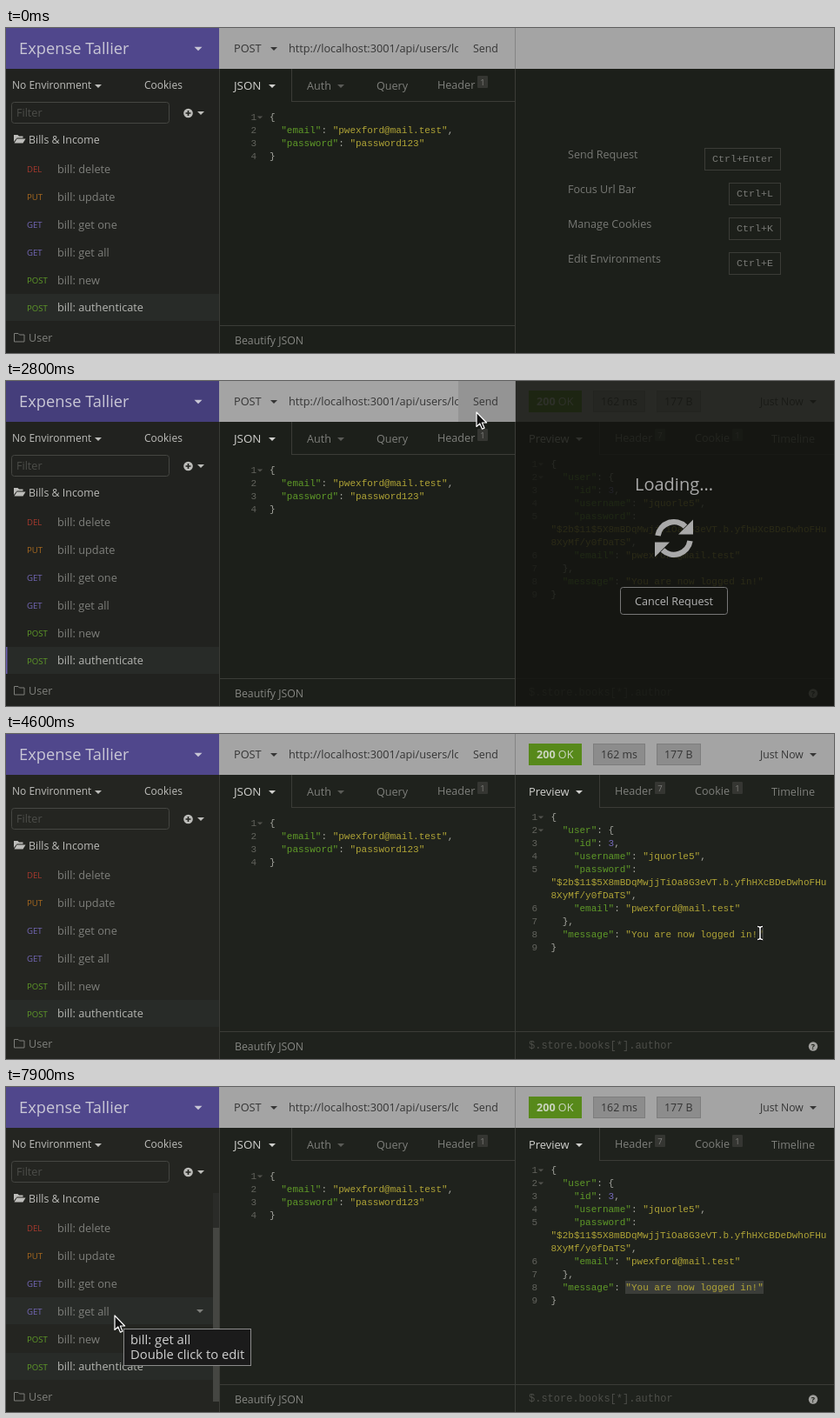
These frames come from a looping animation (952 px wide and 374 px high, 8 s). An HTML page:

```html
<!DOCTYPE html>
<html lang="en">
<head>
<meta charset="utf-8">
<title>API client</title>
<style>
html, body { margin: 0; width: 100%; height: 100%; overflow: hidden; background: #1c1e1a; }
svg { display: block; width: 100vw; height: 100vh; --brand: #50478c; --side: #21221f; --edit: #1c1f1a; }
svg.busy { --brand: #453e7b; }
svg.done { --side: #242521; --edit: #1f221d; }
text { font-family: "Open Sans", "Noto Sans", sans-serif; white-space: pre; }
.mono { font-family: "Liberation Mono", monospace; }
</style>
</head>
<body>
<svg id="stage" viewBox="0 0 952 374" preserveAspectRatio="none"></svg>
<script>
const LOOP = 8000, STEP = 100;
const GREY = '#7e7f7b', LIGHT = '#bdbdba', INK = '#353535', LINE = '#3b3c37', BAR = '#a4a4a4';
const GREEN = '#5f9a28', GOLD = '#b0a436', VIOLET = '#7468b8';

const text = (x, y, s, fill, size = 12.6, more = '') =>
  `<text x="${x}" y="${y}" fill="${fill}" font-size="${size}" ${more}>${s}</text>`;
const mono = (x, y, s, fill, size = 11, more = '') => text(x, y, s, fill, size, 'class="mono" ' + more);
const rect = (x, y, w, h, fill, more = '') =>
  `<rect x="${x}" y="${y}" width="${w}" height="${h}" fill="${fill}" ${more}/>`;
const box = (x, y, w, h, stroke, fill = 'none', r = 0) =>
  rect(x + .5, y + .5, w - 1, h - 1, fill, `stroke="${stroke}" rx="${r}"`);
const caret = (x, y, fill, r = 4) =>
  `<path d="M${x - r} ${y - r / 2}h${2 * r}l${-r} ${r}z" fill="${fill}"/>`;
const group = (id, body) => `<g id="${id}">${body}</g>`;
const badge = (x, n) => rect(x, 55, 12, 14, '#353632', 'rx="1"') + text(x + 6, 66, n, GREY, 9.5, 'text-anchor="middle"');

// One line of JSON with coloured keys, strings and numbers
const json = (x, y, s) => mono(x, y, s.replace(
  /("[^"]*"(?=:))|("[^"]*"?|^\w[^"]*")|(\d+)/g,
  (m, key, str) => `<tspan fill="${key ? GREEN : str ? GOLD : VIOLET}">${m}</tspan>`), '#a6a7a0');
const number = (x, y, n, fold) =>
  mono(x, y, n, '#62635d', 11, 'text-anchor="end"') + (fold ? caret(x + 4, y - 3, '#50514c', 3.2) : '');
// Entries without a number are wrapped parts of the line above
const listing = (x, y, gutter, lines) => lines.map(([n, s, fold], i) =>
  (n ? number(gutter, y + 15 * i, n, fold) : '') + json(x, y + 15 * i, s)).join('');

const rows = [
  ['DEL', 'delete', '#a83a2e'], ['PUT', 'update', '#a8691f'], ['GET', 'get one', VIOLET],
  ['GET', 'get all', VIOLET], ['POST', 'new', GREEN], ['POST', 'authenticate', GREEN]
];
const rowY = i => 146 + 32 * i;

const sidebar =
  rect(0, 0, 245, 374, 'var(--side)') +
  rect(0, 0, 245, 47, 'var(--brand)') +
  text(15, 30, 'Expense Tallier', '#c9c7d6', 18.3) + caret(221, 24, '#c9c7d6', 4.5) +
  text(7, 70, 'No Environment', LIGHT, 12) + caret(106, 67, LIGHT) +
  text(159, 70, 'Cookies', LIGHT, 12) +
  box(6, 85, 182, 25, '#454642', 'none', 3) + text(12, 102, 'Filter', '#4c4d49') +
  `<circle cx="209.5" cy="98" r="5.3" fill="${LIGHT}"/><path d="M206.5 98h6m-3-3v6" stroke="var(--side)" stroke-width="1.6"/>` +
  caret(224, 98, LIGHT) +
  `<path d="M9 131v-8h4.500l1.500 1.500h4.500v2h-7z" fill="${LIGHT}"/><path d="M9.500 132.500l3-5h10l-3 5z" fill="${LIGHT}"/>` +
  text(26, 133, 'Bills &amp; Income', LIGHT, 12.4) +
  rect(0, 306, 245, 31, '#282b28') +
  group('hover', rect(0, 0, 238, 31, '#292c29') + caret(223, 16, GREY)) +
  group('stripe', rect(0, 306, 1.5, 31, '#6a5fae')) +
  rows.map(([verb, name, fill], i) =>
    text(24, rowY(i) + 20, verb, fill, 9.6) +
    text(59, rowY(i) + (i > 4 ? 20 : 21), 'bill: ' + name, i > 4 ? '#b4b5b1' : GREY, 12.75)).join('') +
  `<path d="M9.500 361v-9.500h4.500l1.500 1.500h5.500v8z" fill="none" stroke="${GREY}"/>` +
  text(26, 361, 'User', GREY) +
  group('scroll', rect(238, 122, 7, 240, '#2a2b28') + rect(238, 162, 7, 200, '#454642'));

const editor =
  rect(245, 0, 707, 47, BAR) +
  rect(246, 47, 706, 327, 'var(--edit)') +
  group('press', rect(520, 0, 65, 47, '#949494')) +
  text(262, 28, 'POST', INK, 12.75) + caret(308, 24, INK) +
  `<clipPath id="field">${rect(325, 0, 195, 46, '#000')}</clipPath>` +
  text(325, 28, 'http://localhost:3001/api/users/login', INK, 12.7, 'clip-path="url(#field)"') +
  text(537, 28, 'Send', INK, 12.4) +
  text(262, 71, 'JSON', '#d0d0cd', 13.4) + caret(306, 67, '#d0d0cd') +
  text(346, 71, 'Auth', GREY) + caret(385, 67, '#5a5b57') +
  text(426, 71, 'Query', GREY) + text(496, 70, 'Header', GREY) + badge(542, 1) +
  rect(328, 47, 1, 38, LINE) + rect(328, 84, 257, 1, LINE) +
  listing(303, 106, 288, [
    [1, '{', 1],
    [2, '  "email": "pwexford@mail.test",'],
    [3, '  "password": "password123"'],
    [4, '}']
  ]) +
  rect(246, 342, 339, 1, LINE) + text(263, 364, 'Beautify JSON', '#868783', 12.3) +
  rect(245, 47, 1, 327, LINE);

const shortcuts = [['Send Request', 'Enter'], ['Focus Url Bar', 'L'], ['Manage Cookies', 'K'], ['Edit Environments', 'E']]
  .map(([label, key], i) => {
    const y = 138 + 40 * i, w = key.length > 1 ? 88 : 60;
    return text(646, y + 12, label, '#777874') + box(891 - w, y, w, 26, LINE) +
      mono(900 - w, y + 16, 'Ctrl+' + key, '#777874', 11.7);
  }).join('');

const response =
  rect(601, 11, 61, 25, '#57891a') +
  text(610, 28, '<tspan font-weight="700">200</tspan> OK', '#c9d3bd', 12.6) +
  box(675, 11, 60, 25, '#7d7d7d', '#8c8c8c') + text(684, 28, '162 ms', INK, 12.4) +
  box(748, 11, 51, 25, '#7d7d7d', '#8c8c8c') + text(757, 28, '177 B', INK, 12.4) +
  text(867, 28, 'Just Now', INK, 12.2) + caret(928, 24, INK) +
  text(601, 71, 'Preview', '#d0d0cd', 12.9) + caret(659, 67, '#d0d0cd') +
  text(700, 70, 'Header', GREY) + badge(746, 7) +
  text(792, 70, 'Cookie', GREY) + badge(835, 1) +
  text(880, 71, 'Timeline', GREY) +
  rect(682, 47, 1, 38, LINE) + rect(682, 84, 270, 1, LINE) +
  '<rect id="mark" y="223" height="15" fill="#3b3d39"/>' +
  listing(626.5, 99, 611, [
    [1, '{', 1],
    [2, '  "user": {', 1],
    [3, '    "id": 3,'],
    [4, '    "username": "jquorle5",'],
    [5, '    "password":'],
    [0, '"$2b$11$5X8mBDqMwjjTiOa8G3eVT.b.yfhHXcBDeDwhoFHu'],
    [0, '8XyMf/y0fDaTS",'],
    [6, '    "email": "pwexford@mail.test"'],
    [7, '  },'],
    [8, '  "message": "You are now logged in!"'],
    [9, '}']
  ]) +
  rect(586, 342, 366, 1, LINE) +
  mono(601, 362, '$.store.books[*].author', '#4d4e49', 12) +
  '<circle cx="928" cy="359.500" r="5.2" fill="#a0a09d"/>' +
  text(928, 363, '?', '#22251f', 9, 'text-anchor="middle" font-weight="700"');

const half = '<path d="M-18.500 -3A18.700 18.700 0 0 1 13 -13.500" fill="none" stroke="#a9a9a9" stroke-width="6.500"/>' +
  '<path d="M22 -21.500V-4.500H5Z" fill="#a9a9a9"/>';
const loading =
  rect(586, 0, 366, 374, '#141511', 'fill-opacity=".86"') +
  text(723, 126, 'Loading...', '#a9a9a9', 20) +
  group('spin', half + `<g transform="rotate(180)">${half}</g>`) +
  box(706, 237, 124, 32, '#777', 'none', 3) + text(723, 258, 'Cancel Request', '#b4b4b4');

const tooltip =
  box(135, 278, 147, 43, '#8c8c8c', '#1b1b1b') +
  text(143, 296, 'bill: get all', '#cfcfcf', 14.8) +
  text(143, 313, 'Double click to edit', '#cfcfcf', 14.8);

const beam = 'M-3 -7.500Q0 -7.500 0 -5.500Q0 -7.500 3 -7.500M0 -6V6M-3 7.500Q0 7.500 0 5.500Q0 7.500 3 7.500';
const pointer =
  group('arrow', '<path d="M0 0V16.500L3.800 13 6.500 19.200 9 18.100 6.400 12H11.600Z" fill="#111" stroke="#fff" stroke-width="1.200" stroke-linejoin="round"/>') +
  group('beam', `<path d="${beam}" fill="none" stroke="#000" stroke-width="3.400"/><path d="${beam}" fill="none" stroke="#fff" stroke-width="1.500"/>`);

const stage = document.getElementById('stage');
stage.innerHTML = sidebar + editor + group('keys', shortcuts) + group('reply', response) +
  rect(585, 0, 1, 47, '#858585') + rect(585, 47, 1, 327, LINE) +
  group('loading', loading) + group('tip', tooltip) + group('pointer', pointer);

// time, x, y
const path = [
  [800, 295, 341], [1000, 352, 275], [1300, 470, 150], [1600, 532, 45],
  [1700, 533, 43], [2100, 546, 21], [2600, 546, 21], [2800, 541, 36], [3100, 506, 148], [3400, 506, 148],
  [3500, 545, 164], [3600, 685, 208], [3700, 798, 239], [3800, 843, 239], [4000, 867, 237],
  [4200, 867, 237], [4300, 874, 229], [4500, 874, 229], [4600, 867, 229], [4800, 815, 230],
  [5000, 745, 230], [5200, 711, 230], [5500, 711, 230], [5600, 690, 246], [5800, 530, 318],
  [6000, 330, 353], [6100, 240, 354], [6300, 124, 336], [6400, 111, 329], [6500, 114, 326],
  [6900, 114, 326], [7000, 114, 319], [7200, 121, 285], [7400, 125, 263]
];
const fade = [[2500, 0], [2600, .7], [2700, 1], [2800, 1], [2900, .6], [3000, .25], [3100, 0]];

function at(keys, t) {
  const i = keys.findIndex(k => k[0] > t);
  if (i < 0) return keys[keys.length - 1].slice(1);
  if (i === 0) return keys[0].slice(1);
  const a = keys[i - 1], b = keys[i], p = (t - a[0]) / (b[0] - a[0]);
  return a.slice(1).map((v, j) => v + (b[j + 1] - v) * p);
}

const el = id => document.getElementById(id);
const show = (id, on) => el(id).setAttribute('display', on ? 'inline' : 'none');
const move = (id, x, y, more = '') => el(id).setAttribute('transform', `translate(${x} ${y})${more}`);

function draw(t) {
  const [x, y] = at(path, t), [veil] = at(fade, t);
  const inSide = t > 5600 && x < 245;
  const row = Math.min(5, Math.floor((y - 146) / 32));
  const inCode = x > 246 && y > 85 && y < 342;

  stage.setAttribute('class', t >= 3100 ? 'done' : t >= 2400 ? 'busy' : '');
  show('press', t >= 2400 && t < 3000);
  show('stripe', t >= 2400 && t < 4600);
  show('keys', t < 2700);
  show('reply', t >= 2700);

  show('loading', veil > 0);
  el('loading').setAttribute('opacity', veil);
  move('spin', 768, 181, ` rotate(${(t - 2800) * .36})`);

  const end = 871, start = t < 4600 ? end : Math.min(end, end - Math.round((end - x) / 6.6) * 6.6);
  const left = Math.max(712, start);
  el('mark').setAttribute('x', left);
  el('mark').setAttribute('width', end - left);
  show('mark', t >= 4600);

  show('scroll', inSide || t > 6100);
  show('hover', inSide && y < 338);
  move('hover', 0, rowY(row));

  show('pointer', t >= 800);
  show('arrow', !inCode);
  show('beam', inCode);
  move('pointer', x, y);
  show('tip', t >= 7900);
}

// The selection stays in place once the drag is over
const dragEnd = 5200;
const born = performance.now();
function tick() {
  const t = Math.floor((performance.now() - born) % LOOP / STEP) * STEP;
  draw(t);
  if (t > dragEnd) {
    el('mark').setAttribute('x', 712);
    el('mark').setAttribute('width', 159);
  }
  requestAnimationFrame(tick);
}
tick();
</script>
</body>
</html>
```
